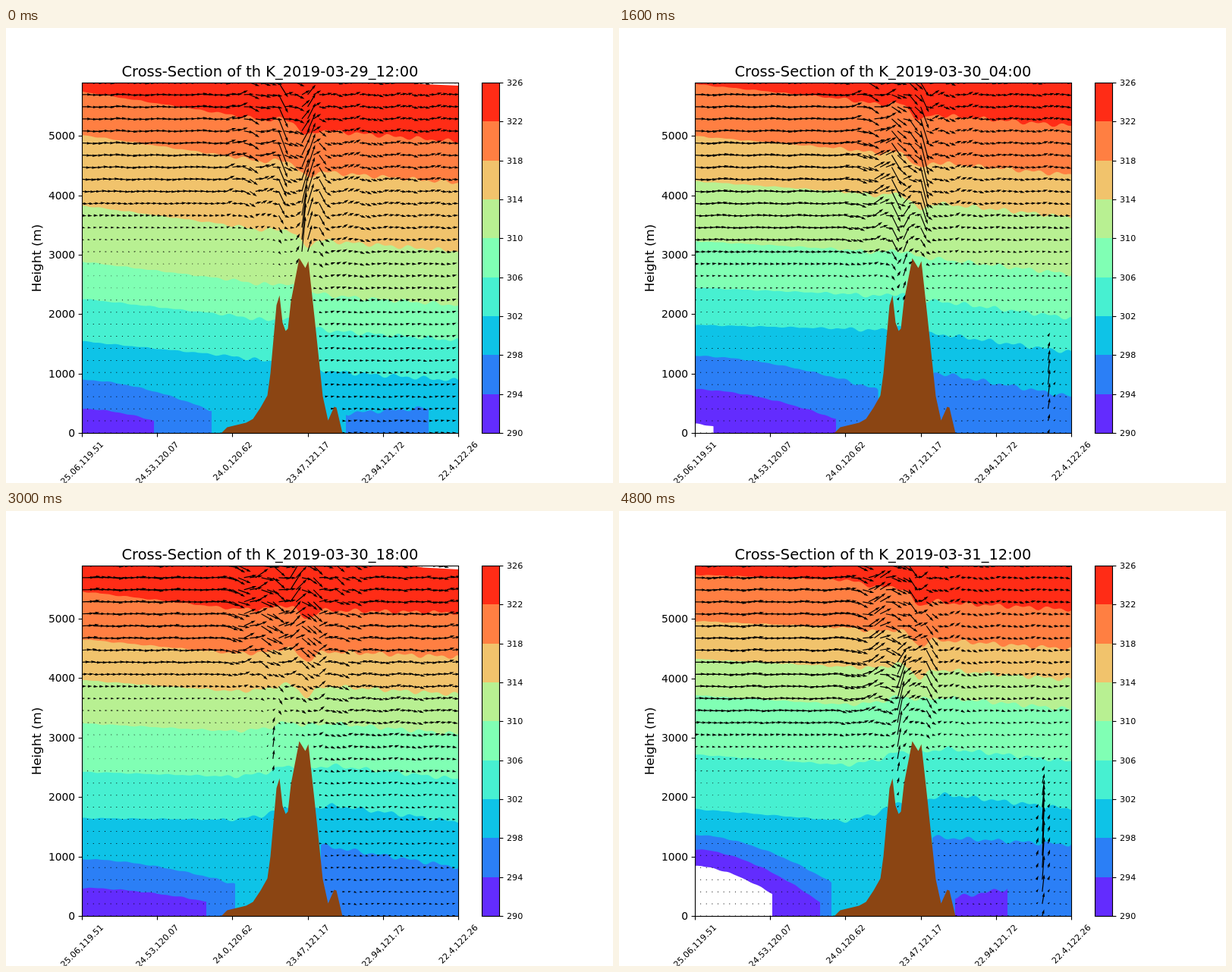
Animation of 800 by 600 pixels, one loop 4900 ms. Source, as an HTML page with a canvas:

```html
<!DOCTYPE html>
<html lang="en">
<head>
<meta charset="utf-8">
<title>Cross-Section</title>
<style>
html, body { margin: 0; width: 100%; height: 100%; overflow: hidden; background: #fff; }
canvas, svg { position: absolute; left: 0; top: 0; width: 800px; height: 600px; }
text { font-family: "DejaVu Sans", sans-serif; fill: #000; }
path, rect { fill: none; stroke: #000; stroke-width: 1.11; }
</style>
</head>
<body>
<canvas id="plot" width="800" height="600"></canvas>
<svg id="axes" viewBox="0 0 800 600"></svg>
<script>
const LEFT = 100, RIGHT = 596, TOP = 72, BOTTOM = 534;
const STEPS = 49, STEP_MS = 100;
const COLS = 65, ROWS = 29;
const DX = (RIGHT - LEFT) / COLS, DY = (BOTTOM - TOP) / ROWS;
const NO_WEST = [LEFT, BOTTOM, BOTTOM], NO_EAST = [430, 444, BOTTOM, BOTTOM];

// edge: layer heights at the west side
// mid, east, lee: shift of the top and bottom layer at x = 300, at the east side, behind the ridge
// west: cold pools [end, y, y at end]; pool: east pools [start, end, y, y at end]
// air: west speed, west shear height, east speed aloft, east speed below
// plumes: [column, y, height, vertical speed]
const keys = [
  { hour: 0, cap: 76, edge: [84, 141, 234, 308, 357, 413],
    mid: [31, 20], east: [66, 52], lee: [6, 6],
    west: [[271, 464, 505], [195, 502, 518]], pool: [[448, 557, 508, 501]],
    air: [12, 240, 9, 5],
    plumes: [[34, 130, 80, 34], [38.5, 180, 100, -34], [38, 290, 50, -36], [41, 190, 80, 16]] },
  { hour: 11, cap: 77, edge: [62, 133, 192, 274, 337, 397],
    mid: [29, 6], east: [76, 58], lee: [12, -3],
    west: [[347, 437, 480], [293, 474, 517]], pool: [[414, 596, 472, 502]],
    air: [12, 320, 7, 2.5],
    plumes: [[39, 150, 80, 75], [34, 200, 90, 34], [35.6, 260, 90, -26], [61, 470, 45, -40]] },
  { hour: 21, cap: 66, edge: [86, 152, 212, 288, 348, 386],
    mid: [11, 4], east: [34, 14], lee: [1, -8],
    west: [[336, 428, 475], [279, 479, 514], [149, 510, 517]], pool: [[415, 596, 436, 470]],
    air: [15, 270, 10, 2],
    plumes: [[37, 130, 70, 30], [39, 200, 70, 40], [34.5, 130, 90, 20], [35.5, 280, 60, -17]] },
  { hour: 30, cap: 77, edge: [106, 169, 223, 280, 344, 405],
    mid: [23, 2], east: [28, 5], lee: [0, -20],
    west: [[302, 459, 492], [264, 497, 515]], pool: [[415, 596, 441, 470]],
    air: [16, 210, 11, 4],
    plumes: [[36, 80, 40, -10], [44, 85, 30, 14], [34, 235, 40, 14], [33, 310, 35, -14]] },
  { hour: 36, cap: 66, edge: [96, 180, 234, 275, 332, 382],
    mid: [18, 7], east: [22, 14], lee: [4, -11],
    west: [[347, 439, 486], [277, 476, 517]], pool: [[414, 596, 430, 470], [422, 444, 495, 515]],
    air: [15, 230, 9, 3],
    plumes: [[35.8, 110, 70, 22], [35, 300, 50, -24], [34, 290, 50, 20], [38, 240, 30, -20]] },
  { hour: 43, cap: 66, edge: [84, 156, 207, 255, 317, 391],
    mid: [20, 8], east: [26, 18], lee: [-4, -18],
    west: [[347, 424, 478], [290, 446, 518], [145, 484, 518]],
    pool: [[414, 596, 424, 455], [444, 472, 512, 497]],
    air: [12, 280, 7, 5],
    plumes: [[37.3, 110, 70, 22], [34, 250, 70, 28], [35, 235, 60, -34], [59, 450, 60, -48]] },
  { hour: 48, cap: 66, edge: [84, 145, 195, 243, 321, 393],
    mid: [7, 16], east: [46, 0], lee: [13, -28],
    west: [[280, 427, 490], [265, 446, 516], [202, 468, 505]],
    pool: [[413, 596, 430, 440], [443, 512, 510, 498]],
    air: [14, 280, 7, 2.5],
    plumes: [[37.3, 110, 60, 24], [35, 260, 65, -36], [40.5, 200, 70, 17], [60, 440, 60, -48]] }
];

const RIDGE = [
  [283, 534], [291, 526], [316, 520], [325, 515], [335, 500], [344, 484], [348, 455], [356, 365],
  [360, 352], [364, 388], [368, 399], [371, 396], [375, 360], [386, 303], [394, 316], [398, 307],
  [406, 380], [417, 485], [424, 517], [432, 499], [435, 500], [443, 534]
].map(([x, y]) => [x + .5, y + .5]);

const ctx = document.getElementById("plot").getContext("2d");
const svg = document.getElementById("axes");
const ridge = polygon(RIDGE);

function polygon(points) {
  const path = new Path2D();
  points.forEach(([x, y]) => path.lineTo(x, y));
  path.closePath();
  return path;
}

function mix(a, b, f) {
  return Array.isArray(a) ? a.map((v, i) => mix(v, b[i], f)) : a + (b - a) * f;
}

const bump = (x, center, width) => Math.exp(-(((x - center) / width) ** 2));
const above = (y, center, width) => 1 / (1 + Math.exp((y - center) / width));

function random(seed) {
  const v = Math.sin(seed * 127.1 + 11.7) * 43758.5453;
  return v - Math.floor(v);
}

function bandColor(i) {
  const v = (i + .5) / 9;
  const rgb = [Math.abs(2 * v - .5), Math.sin(Math.PI * v), Math.cos(Math.PI * v / 2)];
  return `rgb(${rgb.map(c => Math.round(255 * Math.min(1, c)))})`;
}

function fill(points, color) {
  ctx.fillStyle = color;
  ctx.fill(polygon(points));
}

function ripple(x, hour, n) {
  const size = .4 + 1.3 * (1 - above(x, 290, 15));
  return size * (Math.sin(x * .31 + n * 2) + Math.sin(x * .17 + hour * .7 + n));
}

function layerHeight(key, n, x) {
  const [mid, east, lee] = [key.mid, key.east, key.lee].map(([top, low]) => mix(top, low, n / 5));
  const shift = x < 300 ? mid * (x - LEFT) / 200
    : x < 430 ? mix(mid, mix(mid, east, .44) + lee, (x - 300) / 130)
    : mix(mix(mid, east, .44) + lee, east, (x - 430) / 166);
  return key.edge[n] + shift - 6 * bump(x, 368, 18) + (n < 3 ? 12 * bump(x, 396, 12) : 0);
}

function drawLayers(a, b, f, hour) {
  ctx.fillStyle = bandColor(8);
  ctx.fillRect(LEFT, TOP, RIGHT - LEFT + 1, BOTTOM - TOP + 1);
  const cap = mix(a.cap, b.cap, f);
  if (cap > TOP) fill([[533, TOP], [550, (cap + TOP) / 2], [RIGHT, cap], [RIGHT, TOP]], "#fff");

  const area = (start, end, height, n, color) => {
    const points = [[start, BOTTOM + 1]];
    for (let x = start; x < end; x += 3) points.push([x, height(x) + ripple(x, hour, n)]);
    fill([...points, [end, height(end)], [end, BOTTOM + 1]], color);
  };
  for (let n = 0; n < 6; n++) {
    area(LEFT, RIGHT + 1, x => mix(layerHeight(a, n, x), layerHeight(b, n, x), f), n, bandColor(7 - n));
  }
  for (let n = 0; n < 3; n++) {
    const [end, y0, y1] = mix(a.west[n] || NO_WEST, b.west[n] || NO_WEST, f);
    area(LEFT, end, x => mix(y0, y1, ((x - LEFT) / (end - LEFT || 1)) ** 1.7), n, n < 2 ? bandColor(1 - n) : "#fff");
  }
  for (let n = 0; n < 2; n++) {
    const [start, end, y0, y1] = mix(a.pool[n] || NO_EAST, b.pool[n] || NO_EAST, f);
    area(start, end, x => mix(y0, y1, (x - start) / (end - start)), n, bandColor(1 - n));
  }
  ctx.fillStyle = "#8b4513";
  ctx.fill(ridge);
}

function flow(key, col, x, y) {
  const [speed, shear, aloft, below] = key.air;
  const west = 1 + speed * above(y, shear, 28);
  const east = mix(below, aloft, above(y, 280, 40));
  const u = mix(west, east, Math.min(1, Math.max(0, (x - 345) / 85)));
  const rough = x < 285 ? .12 : .35 + .7 * bump(x, 380, 70) * above(y, 310, 30);
  const phase = 6.3 * random(key.hour + 1);
  let w = u * rough * (.6 * Math.sin(col * .9 + y / 70 + phase) + random(col + key.hour * 70) - .5);
  for (const [c, cy, tall, lift] of key.plumes) w += lift * bump(col, c, .75) * bump(y, cy, tall * 1.2);
  return [u, w];
}

function addArrow(x, y, u, w) {
  const unit = 1.19, size = Math.hypot(u, w);
  if (size < unit) {
    ctx.rect(x - .5, y - .5, 1, 1);
    return;
  }
  const s = unit * Math.min(1, size / (5 * unit));
  const c = u / size, d = w / size;
  const shape = [[0, -.5 * s], [size - 4.5 * s, -.5 * s], [size - 5 * s, -1.5 * s], [size, 0],
    [size - 5 * s, 1.5 * s], [size - 4.5 * s, .5 * s], [0, .5 * s]];
  shape.forEach(([p, q], i) =>
    ctx[i ? "lineTo" : "moveTo"](x + p * c - q * d, y + p * d + q * c));
  ctx.closePath();
}

function drawWind(a, b, f) {
  ctx.beginPath();
  for (let row = 0; row <= ROWS; row++) {
    for (let col = 0; col <= COLS; col++) {
      const x = LEFT + col * DX, y = BOTTOM - row * DY;
      if (ctx.isPointInPath(ridge, x, y)) continue;
      addArrow(x, y, ...mix(flow(a, col, x, y), flow(b, col, x, y), f));
    }
  }
  ctx.fillStyle = "#000";
  ctx.fill();
}

function add(tag, attrs, text = "") {
  const el = document.createElementNS("http://www.w3.org/2000/svg", tag);
  for (const name in attrs) el.setAttribute(name, attrs[name]);
  el.textContent = text;
  svg.append(el);
  return el;
}

function label(text, x, y, size, anchor) {
  return add("text", { x, y, "font-size": size, "text-anchor": anchor }, text);
}

const title = label("", 348, 64, 19.44, "middle");
label("Height (m)", 0, 0, 16.67, "middle").setAttribute("transform", "translate(46 303.5) rotate(-90)");

["25.06,119.51", "24.53,120.07", "24.0,120.62", "23.47,121.17", "22.94,121.72", "22.4,122.26"].forEach((name, i) => {
  const x = LEFT + i * 99.2;
  add("path", { d: `M${Math.round(x) + .5} 534.5v4.9` });
  const el = label(name, 0, 4, 11.11, "middle");
  const y = 543.7 + (el.getComputedTextLength() + 10) * .3536;
  el.setAttribute("transform", `translate(${x} ${y}) rotate(-45)`);
});

const heightTicks = [0, 1000, 2000, 3000, 4000, 5000].map(value => ({
  value, mark: add("path", {}), text: label(value, 91.2, 0, 13.89, "end")
}));

const barY = i => Math.round(BOTTOM - i * (BOTTOM - TOP) / 9);
for (let i = 0; i < 9; i++) {
  add("rect", { x: 627, y: barY(i + 1), width: 23, height: barY(i) - barY(i + 1), style: `fill:${bandColor(i)};stroke:none` });
}
for (let i = 0; i <= 9; i++) {
  add("path", { d: `M650.5 ${barY(i) + .5}h4.9` });
  label(290 + i * 4, 660, barY(i) + 4, 11.11, "start");
}
add("rect", { x: 627.5, y: 72.5, width: 23, height: 462 });
add("rect", { x: 100.5, y: 72.5, width: 496, height: 462 });

function draw(hour) {
  let i = 0;
  while (i < keys.length - 2 && hour >= keys[i + 1].hour) i++;
  const a = keys[i], b = keys[i + 1];
  const f = (hour - a.hour) / (b.hour - a.hour);
  ctx.clearRect(0, 0, 800, 600);
  ctx.save();
  ctx.beginPath();
  ctx.rect(LEFT, TOP, RIGHT - LEFT + .5, BOTTOM - TOP + .5);
  ctx.clip();
  drawLayers(a, b, f, hour);
  drawWind(a, b, f);
  ctx.restore();

  const date = new Date(Date.UTC(2019, 2, 29, 12 + hour)).toISOString();
  title.textContent = "Cross-Section of th K_" + date.slice(0, 16).replace("T", "_");
  const ceiling = 5900 - 10 * bump(hour, 30, 4);
  for (const { value, mark, text } of heightTicks) {
    const y = Math.round(BOTTOM - value * (BOTTOM - TOP) / ceiling);
    mark.setAttribute("d", `M100.5 ${y + .5}h-4.9`);
    text.setAttribute("y", y + 5);
  }
}

const start = performance.now();
let shown = -1;
function tick() {
  const hour = Math.floor((performance.now() - start) / STEP_MS) % STEPS;
  if (hour !== shown) draw(shown = hour);
  requestAnimationFrame(tick);
}
tick();
</script>
</body>
</html>
```
